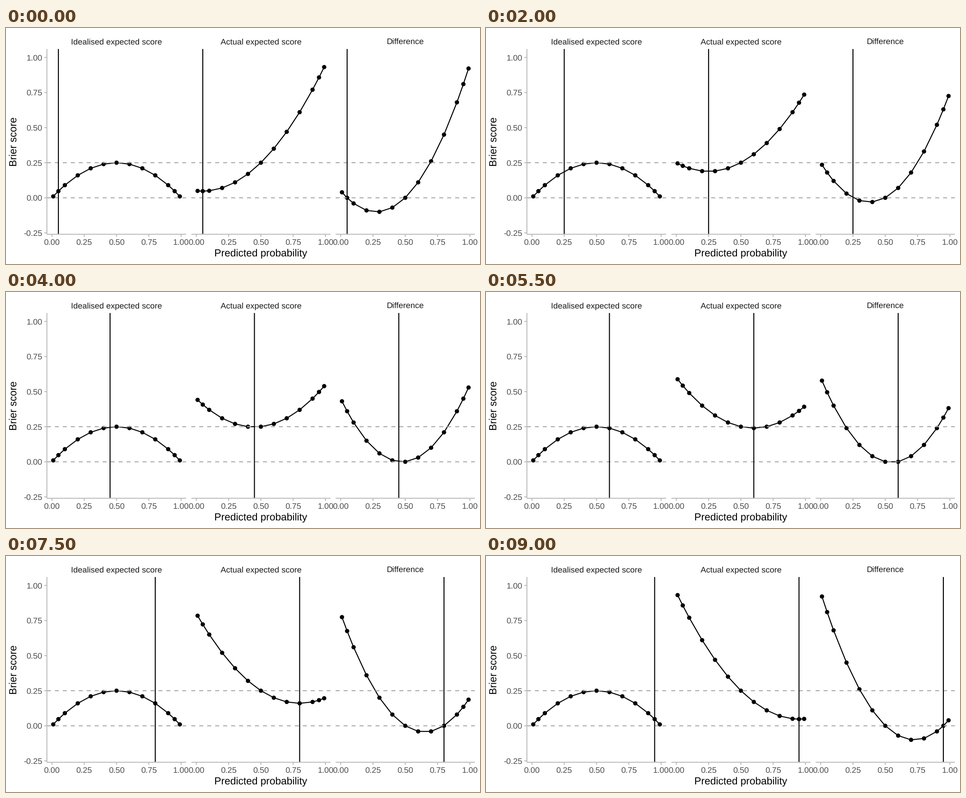
Animation of 1058 by 529 pixels, one loop 9500 ms. Source, as a matplotlib script:

```python
import matplotlib.pyplot as plt
import numpy as np
from matplotlib.animation import FuncAnimation
from matplotlib.patches import Circle

WIDTH, HEIGHT, DPI = 1058, 529, 150
STEPS, STEP_MS = 19, 500

# Panel geometry in pixels
LEFT, TOP, BOTTOM = 91.3, 47.1, 462.4
PANEL_W, PANEL_STEP = 310.77, 322.23
X_MIN, X_MAX = -0.039, 1.039
Y_MIN, Y_MAX = -0.26, 1.06

LINE_PT = 1.067
TICK = 5.73
POINT_R = 4.8
AXIS_GREY, DASH_GREY, LABEL_GREY = "#bebebe", "#a9a9a9", "#4d4d4d"
TITLES = ["Idealised expected score", "Actual expected score", "Difference"]

plt.rcParams["font.family"] = "Liberation Sans"
plt.rcParams["text.hinting"] = "none"

fig = plt.figure(figsize=((WIDTH + 0.01) / DPI, (HEIGHT + 0.01) / DPI),
                 dpi=DPI, facecolor="white")
ax = fig.add_axes([0, 0, 1, 1])
ax.set_xlim(0, WIDTH)
ax.set_ylim(HEIGHT, 0)
ax.axis("off")

predicted = np.concatenate([[0.01, 0.05], np.arange(1, 10) / 10, [0.95, 0.99]])


def to_x(value, panel):
    return LEFT + panel * PANEL_STEP + (value - X_MIN) / (X_MAX - X_MIN) * PANEL_W


def to_y(value):
    return BOTTOM - (value - Y_MIN) / (Y_MAX - Y_MIN) * (BOTTOM - TOP)


def draw_line(xs, ys, color, zorder, **style):
    line, = ax.plot(xs, ys, color=color, lw=LINE_PT, zorder=zorder, snap=False,
                    solid_capstyle="butt", dash_capstyle="butt",
                    solid_joinstyle="round", **style)
    return line


def draw_text(x, baseline, text, size, color, ha="center", **style):
    ax.text(x, baseline, text, fontsize=size, color=color, ha=ha,
            va="baseline", **style)


def scores(true_prob):
    """Score curves for the three panels at a given true probability."""
    ideal = predicted * (1 - predicted)
    actual = true_prob * (1 - predicted) ** 2 + (1 - true_prob) * predicted ** 2
    return ideal, actual, actual - ideal


def build_panel(panel):
    start = LEFT + panel * PANEL_STEP
    end = start + PANEL_W
    draw_text((start + end) / 2, 36, TITLES[panel], 8.8, "#1a1a1a")
    for level in (0, 0.25):
        draw_line([start, end], [to_y(level)] * 2, DASH_GREY, 4,
                  linestyle=(0, (4, 4)))
    draw_line([start, end], [BOTTOM] * 2, AXIS_GREY, 6)
    for value in np.arange(5) / 4:
        x = to_x(value, panel)
        draw_line([x, x], [BOTTOM, BOTTOM + TICK], AXIS_GREY, 6)
        draw_text(x, 486.2, f"{value:.2f}", 8.8, LABEL_GREY)

    xs = to_x(predicted, panel)
    curve = draw_line(xs, xs * 0, "black", 2)
    dots = [ax.add_patch(Circle((x, 0), POINT_R, fc="black", lw=0, zorder=3))
            for x in xs]
    marker = draw_line([start, start], [TOP, BOTTOM], "black", 5)
    return curve, dots, marker


def build_y_axis():
    draw_line([LEFT, LEFT], [TOP, BOTTOM], AXIS_GREY, 6)
    for value in np.arange(-1, 5) / 4:
        y = to_y(value)
        draw_line([LEFT - TICK, LEFT], [y, y], AXIS_GREY, 6)
        draw_text(81, y + 6.4, f"{value:.2f}", 8.8, LABEL_GREY, ha="right")


panels = [build_panel(i) for i in range(3)]
build_y_axis()
draw_text((LEFT + 1046.5) / 2, 512.7, "Predicted probability", 11, "black")
ax.text(28.3, (TOP + BOTTOM) / 2, "Brier score", fontsize=11, color="black",
        rotation=90, ha="right", va="center")


def update(step):
    true_prob = 0.05 * (step + 1)
    for i, (values, (curve, dots, marker)) in enumerate(zip(scores(true_prob), panels)):
        ys = to_y(values)
        curve.set_ydata(ys)
        for dot, x, y in zip(dots, to_x(predicted, i), ys):
            dot.center = (x, y)
        marker.set_xdata([to_x(true_prob, i)] * 2)
    return []


anim = FuncAnimation(fig, update, frames=STEPS, interval=STEP_MS,
                     repeat=True, repeat_delay=0, blit=False)
plt.show()
```
